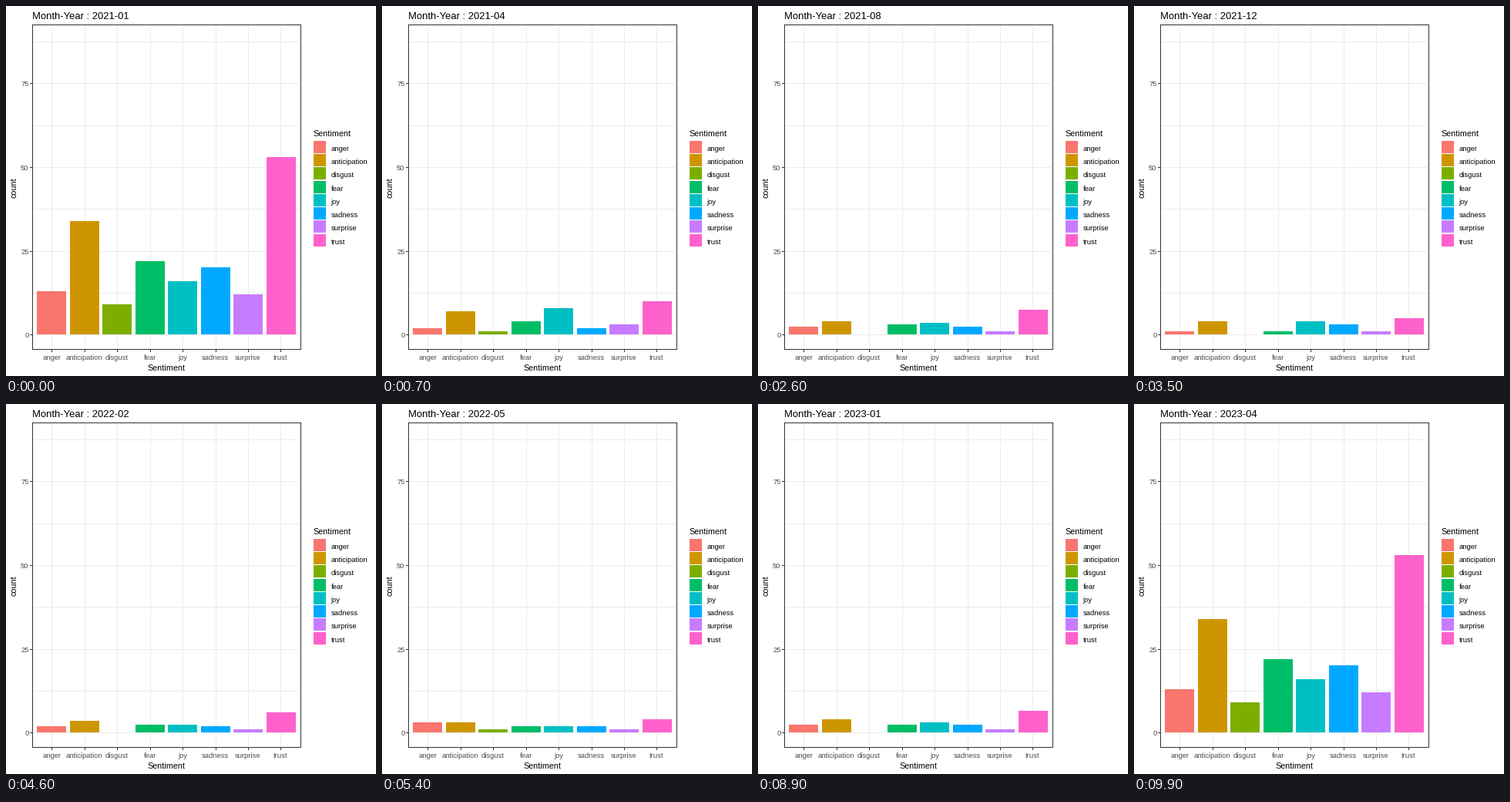
A matplotlib script that plays this animation: 480 by 480 pixels, repeating every 10 s.

```python
import matplotlib.pyplot as plt
from matplotlib.animation import FuncAnimation
from matplotlib.patches import Rectangle

SIZE, DPI, FRAMES, INTERVAL = 480, 72, 100, 100

NAMES = ["anger", "anticipation", "disgust", "fear",
         "joy", "sadness", "surprise", "trust"]
COLORS = ["#F8766D", "#CD9600", "#7CAE00", "#00BE67",
          "#00BFC4", "#00A9FF", "#C77CFF", "#FF61CC"]
GRID, DARK, LABEL = "#EBEBEB", "#333333", "#4D4D4D"

# Panel edges and scales, in pixels
LEFT, RIGHT, TOP, BOTTOM = 34, 382, 24, 445
STEP = (RIGHT - LEFT) / 8.2
UNIT = (BOTTOM - TOP) / (88 * 1.1)
ZERO = 426.4

SKIPPED = {(2021, 2), (2021, 10), (2023, 3)}
MONTHS = [f"{y}-{m:02d}" for y in (2021, 2022, 2023) for m in range(1, 13)
          if (y, m) not in SKIPPED and (y, m) <= (2023, 4)]

# Busy or irregular months are given in full, quiet ones by their level
DETAILED = {
    "2021-01": [13, 34, 9, 22, 16, 20, 12, 53],
    "2021-04": [2, 7, 1, 4, 8, 2, 3, 10],
    "2021-07": [32, 52, 13, 50, 37, 44, 16, 88],
    "2021-11": [1, 3, 0, 1, 3, 2, 2, 5],
    "2021-12": [1, 4, 0, 1, 4, 3, 1, 5],
    "2022-04": [3, 4, 0, 3, 1, 3, 0, 6],
    "2022-05": [3, 3, 1, 2, 2, 2, 1, 4],
    "2022-08": [2, 3, 2, 2, 4, 3, 1, 5],
    "2022-09": [2, 4, 2, 3, 3, 2, 1, 6],
    "2022-10": [2, 2, 2, 2, 2, 2, 1, 4],
}
LEVELS = {
    "2021-03": 4, "2021-05": 3, "2021-06": 9, "2021-08": 6, "2021-09": 9,
    "2022-01": 8, "2022-02": 5, "2022-03": 7, "2022-06": 3, "2022-07": 2,
    "2022-11": 9, "2022-12": 11, "2023-01": 8, "2023-02": 5, "2023-04": 3,
}
SHARES = [40, 65, 15, 45, 50, 40, 20, 100]


def counts(month):
    if month in DETAILED:
        return DETAILED[month]
    return [LEVELS[month] * s // 100 for s in SHARES]


STATES = [counts(m) for m in MONTHS]
STARTS = [0] + [4 * k - (1 if k < 13 else 2) for k in range(1, len(MONTHS))]
HOLD = 3

fig = plt.figure(figsize=(SIZE / DPI, SIZE / DPI), dpi=DPI, facecolor="white")
plt.rcParams["font.family"] = "Liberation Sans"
ax = fig.add_axes([0, 0, 1, 1])
ax.set_xlim(0, SIZE)
ax.set_ylim(SIZE, 0)
ax.axis("off")


def box(x, y, w, h, color, z=1):
    return ax.add_patch(Rectangle((x, y), w, h, facecolor=color, linewidth=0,
                                  antialiased=False, zorder=z))


def text(x, y, s, size, color="black", ha="left", **kw):
    return ax.text(x, y, s, fontsize=size, color=color, ha=ha,
                   va="baseline", **kw)


def y_at(value):
    return round(ZERO - UNIT * value)


def centre(i):
    return LEFT + STEP * (0.6 + i)


# Grid, ticks and axis labels
for k in range(8):
    y = y_at(12.5 * k)
    box(LEFT, y, RIGHT - LEFT, 1, GRID)
    if k % 2 == 0:
        box(LEFT - 3, y, 3, 1, DARK)
        text(29.5, y + 4, f"{25 * k // 2}", 9.4, LABEL, "right")
for i, name in enumerate(NAMES):
    x = int(centre(i) + 0.45)
    box(x, TOP, 1, BOTTOM - TOP, GRID)
    box(x, BOTTOM + 1, 1, 3, DARK)
    text(centre(i) - 0.3, 459, name, 9.4, LABEL, "center")

# Panel border
box(LEFT, TOP, RIGHT - LEFT + 1, 1, DARK, 3)
box(LEFT, BOTTOM, RIGHT - LEFT + 1, 1, DARK, 3)
box(LEFT, TOP, 1, BOTTOM - TOP + 1, DARK, 3)
box(RIGHT, TOP, 1, BOTTOM - TOP + 1, DARK, 3)

# Titles and legend
title = text(33.5, 17, "", 13)
text(207.5, 473, "Sentiment", 10.8, ha="center")
ax.text(16, 235.5, "count", fontsize=10.8, rotation=90, ha="right",
        va="center", rotation_mode="default")
text(398.5, 169, "Sentiment", 10.8)
for i, (name, color) in enumerate(zip(NAMES, COLORS)):
    y = round(174.7 + 17.28 * i)
    box(399, y, 16, 16, color)
    text(421.7, y + 13, name, 9.4)

bars = [box(round(40.46 + STEP * i), y_at(0), 38, 0, c, 2)
        for i, c in enumerate(COLORS)]


def blend(a, b, t):
    # A bar missing on either side is not drawn in between
    return a + (b - a) * t if a and b else 0


def draw(frame):
    k = max(i for i, s in enumerate(STARTS) if s <= frame)
    last = k == len(STARTS) - 1
    end = FRAMES - 1 if last else STARTS[k + 1]
    held = STARTS[k] + (HOLD if k else 2) - 1
    values = STATES[k]
    if frame > held:
        t = (frame - held) / (end - held)
        goal = STATES[0 if last else k + 1]
        values = goal if t >= 1 else [blend(a, b, t)
                                      for a, b in zip(values, goal)]
    for bar, v in zip(bars, values):
        bar.set_y(y_at(v))
        bar.set_height(y_at(0) - y_at(v))
    title.set_text(f"Month-Year : {MONTHS[k]}")
    return [*bars, title]


anim = FuncAnimation(fig, draw, frames=FRAMES, interval=INTERVAL,
                     repeat=True, repeat_delay=0, blit=False)
plt.show()
```
